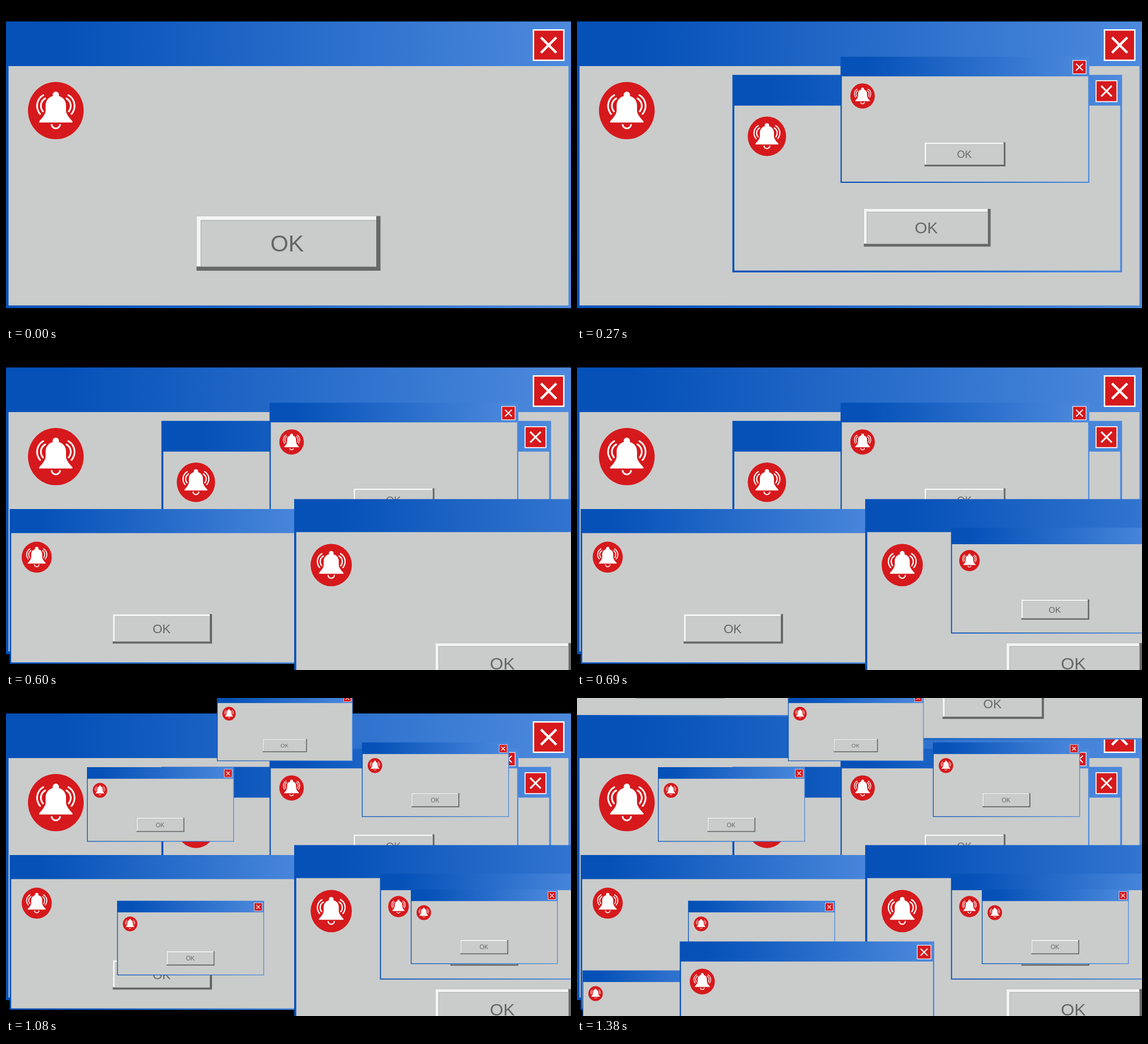
Animation, 998 px wide and 561 px high, one loop 1440 ms. Source, as an HTML page with a canvas:

```html
<!DOCTYPE html>
<html lang="en">
<head>
<meta charset="utf-8">
<title>Popup windows</title>
<style>
html, body { margin: 0; width: 100%; height: 100%; overflow: hidden; background: #000; }
canvas { display: block; }
</style>
</head>
<body>
<canvas id="stage" width="998" height="561"></canvas>
<script>
const ctx = document.getElementById('stage').getContext('2d');
const BEAT = 30, LOOP = 48 * BEAT;
const W = 999, H = 505.7;
const GREY = '#cacccb', RED = '#d6191c', DARK = '#686868', WHITE = '#fff';

// Every popup is the same window at its own place and scale, listed back to front.
const at = (beat, x, y, scale = 0.26) => ({ beat, x, y, scale });
const popups = [
  at(0, -0.5, 27.3, 1),
  at(4, 274.5, 121.5, 0.689),
  at(9, 465.5, 89.5, 0.44),
  at(15, 6.5, 277, 0.54),
  at(20, 509, 259.5, 0.74),
  at(23, 660.6, 310, 0.369),
  at(43, -56.8, -210.5, 0.48),
  at(46, 460, -205.3, 0.551),
  at(25, 372.7, -10, 0.24),
  at(27, 143, 122),
  at(29, 628.7, 78.4),
  at(32, 196.2, 357.7),
  at(36, 715, 337.8),
  at(38, 9.8, 480.6),
  at(40, 181.5, 429.5, 0.45)
];

const blue = ctx.createLinearGradient(0, 0, W, 0);
blue.addColorStop(0.1, '#0551b8');
blue.addColorStop(1, '#4d8add');

function rect(x, y, w, h, color) {
  ctx.fillStyle = color;
  ctx.fillRect(x, y, w, h);
}

function disc(y, rx, ry, color) {
  ctx.fillStyle = color;
  ctx.beginPath();
  ctx.ellipse(0, y, rx, ry, 0, 0, Math.PI * 2);
  ctx.fill();
}

function arc(x, y, r, from, to) {
  ctx.beginPath();
  ctx.arc(x, y, r, from, to);
  ctx.stroke();
}

function closeBox() {
  ctx.save();
  ctx.translate(959, 41.7);
  rect(-28, -28, 56, 56, WHITE);
  rect(-25.5, -25.5, 51, 51, RED);
  ctx.strokeStyle = WHITE;
  ctx.lineWidth = 4.4;
  ctx.beginPath();
  for (const side of [-1, 1]) {
    ctx.moveTo(-13.5 * side, -13.5);
    ctx.lineTo(13.5 * side, 13.5);
  }
  ctx.stroke();
  ctx.restore();
}

function halfBell() {
  ctx.beginPath();
  ctx.moveTo(-0.5, -26.5);
  ctx.bezierCurveTo(10, -26.5, 18, -20, 18, -9);
  ctx.lineTo(18, 0);
  ctx.bezierCurveTo(18, 6, 24, 13, 29, 18.5);
  ctx.quadraticCurveTo(30.5, 20.5, 28.5, 21);
  ctx.lineTo(-0.5, 21);
  ctx.fill();
  for (const r of [15, 21.7]) arc(11.4, -8.4, r, -1.05, 0.72);
}

function bell() {
  ctx.save();
  ctx.translate(88.5, 157.2);
  disc(0, 49.2, 50.6, RED);
  disc(-27.8, 5.6, 5.6, WHITE);
  ctx.strokeStyle = WHITE;
  ctx.lineWidth = 3;
  arc(0, 24, 7.5, 0, Math.PI);
  ctx.lineCap = 'round';
  halfBell();
  ctx.scale(-1, 1);
  halfBell();
  ctx.restore();
}

function okButton() {
  ctx.save();
  ctx.translate(337, 343.2);
  rect(0, 0, 325, 96.5, DARK);
  rect(0, 0, 317.5, 89, '#f3f4f3');
  rect(7.3, 7.2, 310.2, 81.8, '#a9abaa');
  rect(8.5, 8.4, 309, 80.6, GREY);
  ctx.fillStyle = '#666';
  ctx.font = '41px "Liberation Sans", Arial, sans-serif';
  ctx.textAlign = 'center';
  ctx.fillText('OK', 160, 62.6);
  ctx.restore();
}

function drawPopup({ x, y, scale }) {
  ctx.save();
  ctx.translate(x, y);
  ctx.scale(scale, scale);
  rect(0, 0, W, H, blue);
  rect(5, 78.7, W - 10, 422.3, GREY);
  closeBox();
  bell();
  okButton();
  ctx.restore();
}

function draw(time) {
  const beat = (time % LOOP) / BEAT;
  rect(0, 0, 998, 561, '#000');
  popups.filter(p => beat >= p.beat).forEach(drawPopup);
}

const start = performance.now();
function tick() {
  draw(performance.now() - start);
  requestAnimationFrame(tick);
}
tick();
</script>
</body>
</html>
```
